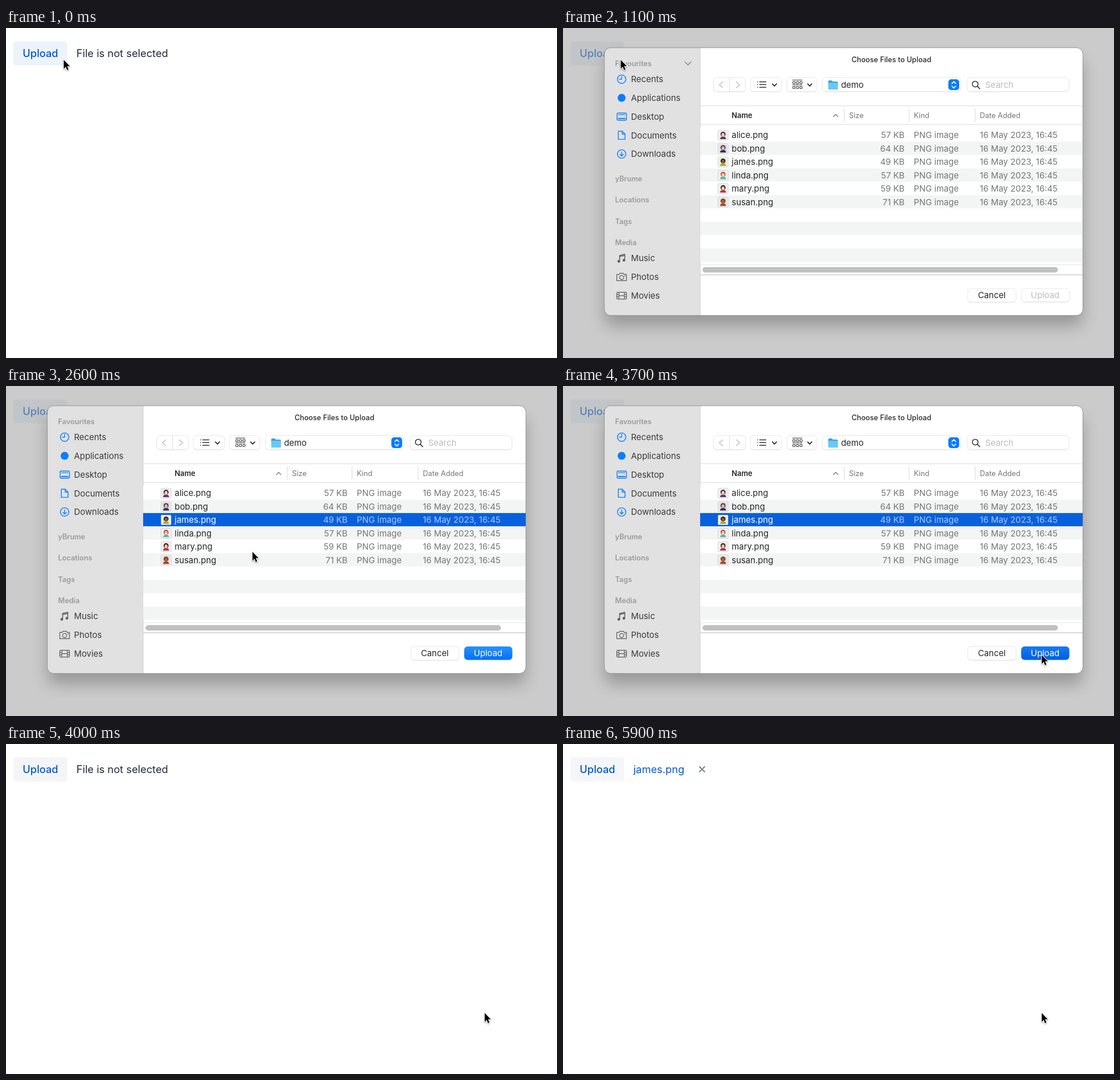
Animation of 968 by 579 pixels, one loop 6600 ms. Source, as an HTML page:

```html
<!DOCTYPE html>
<html lang="en">
<head>
<meta charset="utf-8">
<title>File upload</title>
<style>
  html, body { margin: 0; width: 100%; height: 100%; overflow: hidden; background: #fff; }
  svg { display: block; font-family: Inter, sans-serif; }
  .row.on .bar { fill: #0860de; }
  .row.on .name { fill: #fff; }
  .row.on .info { fill: #adc9f5; }
</style>
</head>
<body>
<svg id="stage" width="968" height="579" viewBox="0 0 968 579"></svg>
<script>
const LOOP = 6600, STEP = 100;
const BLUE = '#0a7cff', GREY = '#757575', INK = '#262626';

// cy is the middle of the capital letters
const text = (x, cy, s, size = 14.9, fill = INK, more = '') =>
  `<text x="${x}" y="${cy + size * .36}" font-size="${size}" fill="${fill}" ${more}>${s}</text>`;
const rect = (x, y, w, h, r, fill, more = '') =>
  `<rect x="${x}" y="${y}" width="${w}" height="${h}" rx="${r}" fill="${fill}" ${more}/>`;
const path = (d, stroke, width = 1.4, more = '') =>
  `<path d="${d}" fill="none" stroke="${stroke}" stroke-width="${width}" stroke-linecap="round" stroke-linejoin="round" ${more}/>`;
const circle = (x, y, r, fill, more = '') => `<circle cx="${x}" cy="${y}" r="${r}" fill="${fill}" ${more}/>`;
const field = (x, w, y = 87, h = 24.5) =>
  rect(x, y + 1, w, h, 6, '#00000018') + rect(x, y, w, h, 6, '#fff', 'stroke="#e0e0e0" stroke-width=".8"');

const ICONS = {
  clock: circle(0, 0, 7.4, 'none', `stroke="${BLUE}" stroke-width="1.4"`) + path('M0-5V0H-4', BLUE),
  dot: circle(0, 0, 7, BLUE),
  desk: rect(-8, -6.2, 16.5, 12.6, 2, 'none', `stroke="${BLUE}" stroke-width="1.4"`) +
    path('M-5.5-3.2H6', BLUE, 1.2) + path('M-5.5 3.4H6', BLUE, 2),
  page: path('M-5.8-7.2H1L6-2V7.2H-5.8ZM1-7V-2H6', BLUE),
  down: circle(0, 0, 7.4, 'none', `stroke="${BLUE}" stroke-width="1.4"`) + path('M0-3.8V3.6M-3 .8L0 3.8 3 .8', BLUE),
  note: path('M-3.5 5V-5L5.5-7V3M-3.5-3L5.5-5', '#5c5c5c', 1.5) +
    circle(-5, 5.4, 2.3, '#5c5c5c') + circle(4, 3.6, 2.3, '#5c5c5c'),
  camera: path('M-8.5-4.5H-4.5L-3-6.5H3L4.5-4.5H8.5V6.5H-8.5Z', '#5c5c5c', 1.2) +
    circle(0, 1, 3.6, 'none', 'stroke="#5c5c5c" stroke-width="1.2"') + circle(5.9, -1.9, .9, '#5c5c5c'),
  film: rect(-8.5, -6, 17, 12, 1.5, 'none', 'stroke="#5c5c5c" stroke-width="1.2"') +
    path('M-4.8-6V6M4.8-6V6M-4.8 0H4.8M-8.5-2H-4.8M-8.5 2H-4.8M4.8-2H8.5M4.8 2H8.5', '#5c5c5c', 1.1)
};
const item = (icon, cy, label) =>
  `<g class="item"><g transform="translate(103 ${cy})">${ICONS[icon]}</g>${text(119.5, cy, label, 14.9, '#3a3a3a')}</g>`;
const heading = (cy, label, more = '') => text(91.5, cy, label, 12.7, '#9a9a9a', 'font-weight="600" ' + more);

const sidebar = () => rect(73, 35, 168, 469, 0, '#e1e1e1', 'id="side" clip-path="url(#sheet)"') +
  heading(62, 'Favourites') + path('M214.3 59.6l5.2 5 5.2-5', '#8c8c8c', 1.5, 'id="fold"') +
  item('clock', 89.8, 'Recents') + item('dot', 122.6, 'Applications') + item('desk', 155.4, 'Desktop') +
  item('page', 188.2, 'Documents') + item('down', 221, 'Downloads') +
  heading(264, 'yBrume') + heading(301.3, 'Locations', 'id="places"') +
  `<g id="lower">${heading(339, 'Tags') + heading(376.4, 'Media') +
    item('note', 404, 'Music') + item('camera', 436.8, 'Photos') + item('film', 469.6, 'Movies')}</g>`;

const chevron = x => path(`M${x - 3.6} 98.2l3.6 3.6 3.6-3.6`, '#2a2a2a', 1.8);
const arrows = (color, id) => path('M683.3 97.4l3.3-3.3 3.3 3.3M683.3 102l3.3 3.3 3.3-3.3', color, 1.7, `id="${id}"`);
const toolbar = () => {
  const lines = [94.5, 99.3, 104.1].map(y => path(`M341.6 ${y}h.4M345.5 ${y}H356.5`, '#333', 1.5)).join('');
  const grid = [0, 1, 2, 3, 4, 5].map(i => {
    const x = 403.8 + i % 3 * 6.2, y = i < 3 ? 94 : 102.5;
    return rect(x, y, 3.8, 3.8, .8, 'none', 'stroke="#333" stroke-width="1.1"');
  }).join('');
  return text(577, 55.3, 'Choose Files to Upload', 12.7, INK, 'font-weight="500" text-anchor="middle"') +
    field(264.5, 56) + path('M292.5 87V111', '#dedede', 1) +
    path('M280.5 94.5l-6 5 6 5M304.5 94.5l6 5-6 5', '#bdbdbd', 1.5) +
    field(329, 55) + lines + chevron(371.5) +
    field(393, 53) + path('M403.5 91.3H420M403.5 99.9H420', '#333', 1) + grid + chevron(433.5) +
    field(455.5, 243.5) +
    '<path d="M466 94q0-2 2-2h4l2 2h7q2 0 2 2v10q0 2-2 2h-13q-2 0-2-2z" fill="#36a5dd"/>' +
    rect(466, 96, 17, 12, 1.8, '#67c9f6') + text(488.5, 99.5, 'demo') +
    rect(677, 90, 19, 19, 5, BLUE, 'id="stepper"') + arrows('#fff', 'lit') + arrows('#222', 'unlit') +
    field(710, 179) + circle(724.2, 98.4, 5, 'none', 'stroke="#333" stroke-width="1.5"') +
    path('M728 102.3l4.2 4.2', '#333', 1.7) + text(741.8, 100, 'Search', 14.9, '#bcbcbc');
};

// backdrop, hair, skin, clothes
const FILES = [
  ['alice', 57, '#eee7ef', '#35232d', '#f0cabb', '#5b3b58'],
  ['bob', 64, '#d5d8ee', '#4e3328', '#e9b899', '#283254'],
  ['james', 49, '#eceadb', '#2b211c', '#8b5c38', '#a4ac32'],
  ['linda', 57, '#e5f2ec', '#df3f2d', '#f4cdb9', '#58b9a5'],
  ['mary', 59, '#f3e9e8', '#2b2024', '#f0c8b5', '#bd3034'],
  ['susan', 71, '#eadfd8', '#753a20', '#a8633f', '#9c4630']
];
const thumb = (cy, [back, hair, skin, cloth]) => `<g transform="translate(281.2 ${cy})">` +
  rect(-8.7, -8.4, 17.4, 17, 1, '#fff', 'stroke="#bcbcbc" stroke-width=".8"') + rect(-7, -7, 14, 14, 0, back) +
  circle(0, -1.7, 4.3, hair) + `<path d="M-5.2 7q0-4.5 5.2-4.5T5.2 7z" fill="${cloth}"/>` +
  `<ellipse cy="-.6" rx="2.6" ry="3.3" fill="${skin}"/></g>`;

const row = i => {
  const y = 176 + 23.45 * i, cy = y + 12, file = FILES[i];
  const info = 'class="info"';
  let out = rect(241, y, 672, 23.45, 0, i % 2 ? '#f3f5f5' : '#fff', 'class="bar"');
  if (file) {
    const [name, size, ...tones] = file;
    out += thumb(cy, tones) + text(296.3, cy, name + '.png', 14.9, INK, 'class="name"') +
      text(600, cy, size + ' KB', 14.9, GREY, info + ' text-anchor="end"') +
      text(616.3, cy, 'PNG image', 14.9, GREY, info) + text(732.3, cy, '16 May 2023, 16:45', 14.9, GREY, info);
  }
  return `<g class="row">${out}</g>`;
};
const table = () => {
  const line = (y, w = 1, c = '#dcdcdc') => rect(241, y, 672, w, 0, c);
  return line(136) + line(169) + [494, 608, 724].map(x => rect(x - .5, 141, 1, 24, 0, '#dadada')).join('') +
    text(296.3, 153, 'Name', 12.9, INK, 'font-weight="600"') + path('M475 155.5l4-4 4 4', '#777', 1.2) +
    text(502.5, 153, 'Size', 12.8, GREY) + text(616.3, 153, 'Kind', 12.8, GREY) +
    text(732.3, 153, 'Date Added', 12.8, GREY) + [...Array(10).keys()].map(row).join('') +
    line(415, 1, '#e4e4e4') + rect(245, 419.5, 624.5, 9.5, 4.75, '#c0c0c0') + line(432, 2, '#dadada');
};
const buttons = () => field(711, 85, 457, 24) + text(753.3, 468.4, 'Cancel', 14.9, INK, 'text-anchor="middle"') +
  field(805, 84.5, 457, 23.5) + rect(805, 457, 84.5, 23.5, 6, 'url(#blue)', 'id="go"') +
  text(847, 468.4, 'Upload', 14.9, '#bdbdbd', 'id="goText" text-anchor="middle"');

stage.innerHTML = `<defs>
  <clipPath id="sheet">${rect(73, 35, 840, 469, 11, '#000')}</clipPath>
  <linearGradient id="blue" x2="0" y2="1"><stop stop-color="#2792ff"/><stop offset="1" stop-color="#0070f8"/></linearGradient>
  <linearGradient id="pressed" x2="0" y2="1"><stop stop-color="#147bf3"/><stop offset="1" stop-color="#005fe2"/></linearGradient>
  </defs>` +
  rect(13, 23.5, 94.5, 42, 4.5, '#ecf3fa', 'id="upload"') +
  text(29.3, 44.9, 'Upload', 18.3, '#0058d2', 'font-weight="500"') +
  text(123.7, 44.9, 'File is not selected', 18.3, '#1f2a3d', 'id="empty"') +
  `<g id="chosen">${text(123.7, 44.9, 'james.png', 18.3, '#0058d2') +
    path('M239.8 39.8l9 9M248.8 39.8l-9 9', '#76828f', 2)}</g>` +
  rect(0, 0, 968, 579, 0, '#919191', 'id="dim"') +
  `<g id="dialog">${rect(73, 55, 840, 468, 14, '#000', 'id="shadow" opacity=".25"') +
    rect(73, 35, 840, 469, 11, '#fff') + sidebar() + rect(240.5, 35, 1, 469, 0, '#cfcfcf') +
    toolbar() + table() + buttons() +
    rect(72.7, 34.7, 840.6, 469.6, 11, 'none', 'stroke="#8f8f8f" stroke-width=".8"')}</g>` +
  circle(0, 0, 26, '#808080', 'id="press" opacity=".28"') +
  `<path id="cursor" d="M0 0V15.4L3.5 12.1 5.8 17.8 8.3 16.7 5.9 11.1H10.6Z" fill="#000" stroke="#fff" stroke-width="2"
    stroke-linejoin="round" paint-order="stroke" style="filter:drop-shadow(0 1px 1px #0006)"/>`;

const $ = id => document.getElementById(id);
const show = (id, on) => $(id).setAttribute('visibility', on ? 'inherit' : 'hidden');
const set = (id, attrs) => { for (const k in attrs) $(id).setAttribute(k, attrs[k]); };
const mix = (a, b, k) => a + (b - a) * k;
const clamp = k => Math.min(1, Math.max(0, k));

// keys: [time, ...values], straight between neighbours
function track(keys, t) {
  const n = keys.findIndex(k => k[0] > t);
  if (n < 0) return keys[keys.length - 1].slice(1);
  if (n === 0) return keys[0].slice(1);
  const a = keys[n - 1], b = keys[n], k = (t - a[0]) / (b[0] - a[0]);
  return a.slice(1).map((v, i) => mix(v, b[i + 1], k));
}
const MOVES = [
  [0, 101.5, 56], [1200, 101.5, 56], [1400, 145, 85], [1600, 265, 160], [1800, 385, 238], [1900, 409, 255],
  [2000, 413, 237], [2400, 413, 237], [2500, 416, 250], [2600, 433, 291], [2700, 510, 345], [2800, 625, 395],
  [2900, 730, 430], [3000, 815, 450], [3100, 857, 458], [3300, 841, 472]
];
const FADE = [[500, 0], [600, .5], [700, 1], [3700, 1], [3800, .75], [3900, .2], [4000, 0]];
const CLICKS = [100, 2100, 3400];

function draw(t) {
  const open = clamp((t - 600) / 200), active = t >= 800;
  const [alpha] = track(FADE, t), [x, y] = track(MOVES, t);
  const done = t >= 4200, picked = t >= 2100, down = t >= 3400;

  set('upload', { fill: t < 3800 ? '#ecf3fa' : done ? '#f4f6f9' : '#f3f5f6' });
  show('empty', !done);
  show('chosen', done);

  const grey = Math.round(mix(127, 161, open));
  set('dim', { fill: `rgb(${grey},${grey},${grey})`, opacity: alpha * mix(.1, .55, open) });
  set('dialog', { opacity: alpha, transform: `translate(0 ${mix(-19, 0, open)})` });
  show('dialog', alpha > 0);
  set('shadow', { y: mix(39, 55, open) });
  $('shadow').style.filter = `blur(${mix(3, 14, open)}px)`;

  set('side', { fill: active ? '#e1e1e1' : '#e4e5e7' });
  document.querySelectorAll('.item').forEach(e => e.setAttribute('opacity', active ? 1 : .42));
  show('fold', t < 1300);
  show('places', t >= 900);
  set('lower', { transform: `translate(0 ${t >= 900 ? 0 : -37.6})` });
  show('stepper', active);
  show('lit', active);
  show('unlit', !active);

  document.querySelectorAll('.row')[2].classList.toggle('on', picked);
  show('go', picked);
  set('go', { fill: down ? 'url(#pressed)' : 'url(#blue)' });
  set('goText', { fill: picked ? '#fff' : '#bdbdbd' });

  const place = `translate(${x} ${y})`;
  set('cursor', { transform: place });
  set('press', { transform: place });
  show('press', CLICKS.some(c => t >= c && t < c + 200));
}

const start = performance.now();
function tick() {
  const t = (performance.now() - start) % LOOP;
  draw(Math.floor(t / STEP) * STEP);
  requestAnimationFrame(tick);
}
tick();
</script>
</body>
</html>
```
